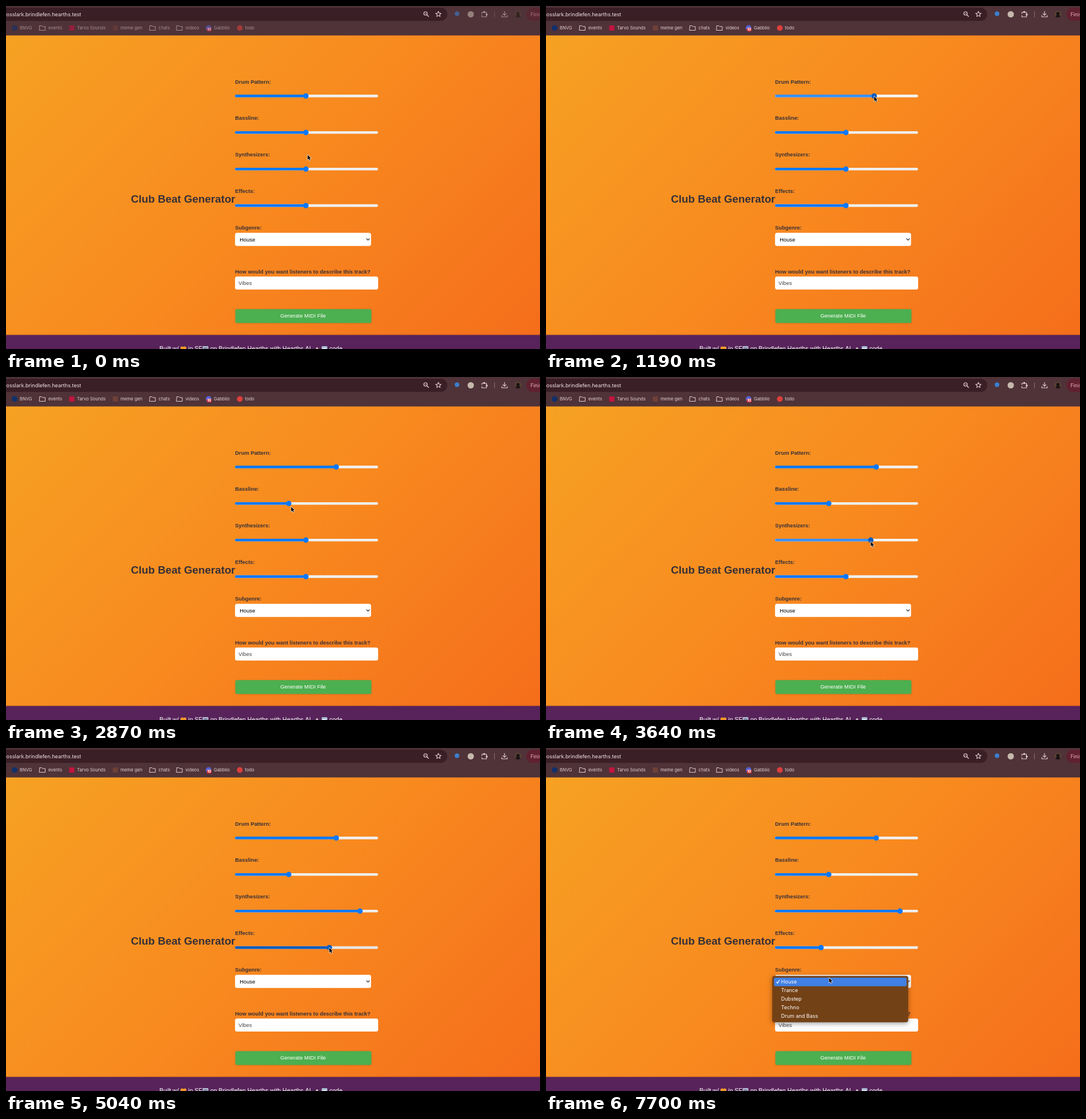
Animation of 933x600 px, one loop 8000 ms. Source, as an HTML page with a canvas:

```html
<!DOCTYPE html>
<html lang="en">
<head>
<meta charset="utf-8">
<title>Club Beat Generator</title>
<style>
html, body { margin: 0; width: 100%; height: 100%; overflow: hidden; background: #f88b1f; }
canvas { display: block; }
</style>
</head>
<body>
<canvas id="stage" width="933" height="600"></canvas>
<script>
const ctx = document.getElementById('stage').getContext('2d');
const LOOP = 8000, STEP = 70;
const PAGE = '"Liberation Sans", Arial, sans-serif';
const UI = 'Inter, Roboto, sans-serif';
const INK = '#e2ced2', LABEL = '#363038', BAR = '#4f3338';
const THUMB_START = 524;

// One gesture per slider: the pointer reaches it, presses, drags and leaves.
const SLIDERS = [
  { label: 'Drum Pattern:', reach: 980, press: 980, drag: 980, drop: 1330, leave: 1470, lit: 490,
    from: [568, 157], to: [577, 159] },
  { label: 'Bassline:', reach: 1960, press: 2310, drag: 2310, drop: 2520, leave: 2840, lit: 350,
    from: [524, 221], to: [494, 221] },
  { label: 'Synthesizers:', reach: 3430, press: 3640, drag: 3710, drop: 4130, leave: 4340, lit: 490,
    from: [567.5, 288], to: [618.5, 286] },
  { label: 'Effects:', reach: 4830, press: 4900, drag: 6160, drop: 6440, leave: 7210, lit: 140,
    from: [565, 349.5], to: [480.5, 341.5] }
].map((s, i) => ({ ...s, y: 157.4 + 63.9 * i }));

// Pointer stops between the gestures: [time, x, y]
const PATH = [
  [0, 527, 260.5], [630, 527, 260.5], [840, 567, 166], [1750, 556, 208],
  [3220, 548, 297], [4620, 572, 361], [7490, 494.5, 402]
].concat(SLIDERS.flatMap(s => [
  [s.reach, ...s.from], [s.drag, ...s.from], [s.drop, ...s.to], [s.leave, ...s.to]
])).sort((a, b) => a[0] - b[0]);

const LOOK = {
  idle: { fill: '#0a78fa', knob: '#0a78fa', rest: '#efefef' },
  hover: { fill: '#0a5cc0', knob: '#0a5cc0', rest: '#e8e5e2' },
  press: { fill: '#3a90fb', knob: '#0a5cc0', rest: '#f3f3f3' }
};

const clamp = v => Math.min(1, Math.max(0, v));
const mix = (a, b, k) => a + (b - a) * k;
const progress = (t, a, b) => clamp((t - a) / (b - a));

function pointerAt(t) {
  const next = PATH.findIndex(p => p[0] > t);
  if (next < 0) return PATH[PATH.length - 1].slice(1);
  const a = PATH[next - 1], b = PATH[next], k = progress(t, a[0], b[0]);
  return [mix(a[1], b[1], k), mix(a[2], b[2], k)];
}

function text(str, x, y, size, color, font = PAGE, weight = 400, align = 'left') {
  ctx.font = `${weight} ${size}px ${font}`;
  ctx.textAlign = align;
  ctx.fillStyle = color;
  ctx.fillText(str, x, y);
}
const label = (str, y) => text(str, 400.3, y, 9.4, LABEL, PAGE, 700);

function box(x, y, w, h, r, color) {
  ctx.beginPath();
  ctx.roundRect(x, y, w, h, r);
  ctx.fillStyle = color;
  ctx.fill();
}

function dot(x, y, r, color) {
  ctx.beginPath();
  ctx.arc(x, y, r, 0, 7);
  ctx.fillStyle = color;
  ctx.fill();
}

function line(points, color, width, close) {
  ctx.beginPath();
  points.forEach(([x, y]) => ctx.lineTo(x, y));
  if (close) ctx.closePath();
  ctx.strokeStyle = color;
  ctx.lineWidth = width;
  ctx.lineJoin = ctx.lineCap = 'round';
  ctx.stroke();
}

function shaded(color, blur, dy, draw) {
  ctx.save();
  ctx.shadowColor = color;
  ctx.shadowBlur = blur;
  ctx.shadowOffsetY = dy;
  draw();
  ctx.restore();
}

function folder(x, y) {
  line([[x, y - 4], [x + 4, y - 4], [x + 5.5, y - 2.5], [x + 10, y - 2.5], [x + 10, y + 4], [x, y + 4]],
       INK, 1, true);
}

function star(x, y) {
  const points = Array.from({ length: 10 }, (_, i) => {
    const r = i % 2 ? 2.3 : 5, a = i * Math.PI / 5 - Math.PI / 2;
    return [x + r * Math.cos(a), y + r * Math.sin(a)];
  });
  line(points, INK, 1.1, true);
}

function magnifier(x, y) {
  ctx.beginPath();
  ctx.arc(x, y, 3, 0, 7);
  ctx.strokeStyle = INK;
  ctx.lineWidth = 1.2;
  ctx.stroke();
  line([[x + 2.4, y + 2.4], [x + 5.2, y + 5.2]], INK, 1.4);
  line([[x - 1.2, y], [x + 1.2, y]], INK, 0.8);
}

function puzzle(x, y) {
  line([[x - 4, y - 3], [x + 4, y - 3], [x + 4, y + 5], [x - 4, y + 5]], INK, 1.2, true);
  dot(x, y - 3.6, 1.7, INK);
  dot(x + 4.5, y + 1, 1.7, INK);
  dot(x - 3.8, y + 1, 1.4, BAR);
}

function download(x, y) {
  line([[x, y - 4.5], [x, y + 2]], INK, 1.2);
  line([[x - 2.8, y - 0.6], [x, y + 2.2], [x + 2.8, y - 0.6]], INK, 1.2);
  line([[x - 4.7, y + 2.5], [x - 4.7, y + 5], [x + 4.7, y + 5], [x + 4.7, y + 2.5]], INK, 1.2);
}

function avatar(x, y) {
  ctx.save();
  ctx.beginPath();
  ctx.arc(x, y, 6, 0, 7);
  ctx.clip();
  box(x - 6, y - 6, 12, 12, 0, '#5b4334');
  dot(x, y - 1, 3, '#1c1416');
  dot(x, y + 6, 5, '#1c1416');
  ctx.restore();
}

function addressBar(t) {
  const focus = t >= 630 && t < 1050;
  box(-30, 3, 801, 23, 11.5, focus ? '#523238' : '#3b1f26');
  if (focus) {
    ctx.strokeStyle = '#eab0b6';
    ctx.lineWidth = 1.7;
    ctx.stroke();
    box(-2, 9, 134, 11.5, 0, '#e8b6ba');
  }
  text('mosslark.brindlefen.hearths.test', 131.3, 17.8, 9.1, focus ? '#40222a' : '#f0e4e6', UI, 400, 'right');
  magnifier(733, 13);
  star(755.5, 14.3);
}

function toolbar() {
  dot(788, 13.5, 4, '#3b7fd0');
  dot(812, 14.5, 5.5, '#c6b9ac');
  puzzle(835.5, 14);
  line([[853.5, 9.5], [853.5, 19.5]], '#8b6a70', 1);
  download(871, 14);
  avatar(894.5, 14.3);
  box(909, 3, 60, 23, 11.5, '#5f2130');
  text('Finish', 916.5, 17.8, 8.8, '#f0b4bd', UI);
}

const disc = color => x => dot(x + 5, 38.5, 5, color);
const tile = color => x => box(x + 0.5, 34, 9, 9, 0, color);
const directory = x => folder(x - 1.5, 38.5);
function chat(x) {
  disc('#5662d8')(x);
  box(x + 2, 38, 8, 6.5, 2, '#d8343c');
  text('10', x + 6, 43.4, 6, '#fff', UI, 700, 'center');
}
const BOOKMARKS = [
  ['BNVG', 24, disc('#12306b')], ['events', 74, directory], ['Tarvo Sounds', 124, tile('#c3143f')],
  ['meme gen', 200, tile('#6e4038')], ['chats', 266.5, directory], ['videos', 313.5, directory],
  ['Gabblio', 363, chat], ['todo', 417.5, disc('#dd3f3c')]
];

function browser(t) {
  box(0, 0, 933, 51.6, 0, BAR);
  addressBar(t);
  ctx.globalAlpha = mix(0.58, 1, progress(t, 0, 420));
  toolbar();
  for (const [name, x, icon] of BOOKMARKS) {
    icon(x - 14);
    text(name, x, 41.3, 7.7, INK, UI);
  }
  ctx.globalAlpha = 1;
}

function slider(s, t) {
  const hover = t >= s.reach && t < s.leave;
  const press = t >= s.press && t < s.press + s.lit;
  const look = LOOK[press ? 'press' : hover ? 'hover' : 'idle'];
  const x = t < s.press ? THUMB_START : mix(s.from[0], s.to[0], progress(t, s.drag, s.drop));
  label(s.label, s.y - 21.9);
  box(400, s.y - 2.3, 250, 4.6, 2.3, look.rest);
  box(400, s.y - 2.3, x - 400, 4.6, 2.3, look.fill);
  dot(x, s.y, 4.7, look.knob);
}

function page(t) {
  const g = ctx.createLinearGradient(0, 0, 754, 754);
  g.addColorStop(0, '#f6a323');
  g.addColorStop(0.5, '#f88a1f');
  g.addColorStop(1, '#f56e1b');
  box(0, 0, 933, 600, 0, g);

  text('Club Beat Generator', 218.3, 344.4, 18.75, LABEL, PAGE, 700);
  SLIDERS.forEach(s => slider(s, t));

  label('Subgenre:', 391.2);
  box(400.2, 396.7, 237.6, 23, 3.5, '#fff');
  text('House', 408.3, 411.6, 9.4, '#000');
  line([[630, 407], [632.5, 409.6], [635, 407]], '#222', 1.1);

  label('How would you want listeners to describe this track?', 467.7);
  box(400.2, 473.2, 250, 22.8, 3.5, '#fff');
  text('Vibes', 406.3, 487.6, 9.4, '#444');

  shaded('rgba(0,0,0,.15)', 3, 0.5, () => box(400.7, 530.2, 237.8, 24.2, 3, '#4caf50'));
  text('Generate MIDI File', 519, 545.4, 9.45, '#fff', PAGE, 400, 'center');
}

function footer() {
  shaded('rgba(60,10,40,.3)', 3, -0.5, () => box(-9, 575.6, 951, 40, 0, '#57235a'));
  const say = (s, x) => text(s, x, 602.8, 10.5, '#fff');
  say('Built w/', 268);
  dot(307.7, 598.3, 2.8, '#f39a2c');
  dot(312.3, 598.3, 2.8, '#f39a2c');
  say('in SF', 318.3);
  box(343.5, 595, 10, 9, 1, '#b9c0d2');
  box(345, 597, 7, 7, 0, '#7f86a6');
  say('on Brindlefen Hearths with Hearths AI', 357);
  dot(543.5, 599, 2, '#c9b9bd');
  box(551.5, 595, 10, 9, 1.5, '#a9bfd6');
  line([[553.5, 599.5], [559, 599.5]], '#fff', 1.5);
  say('code', 565);
}

function menu() {
  shaded('rgba(0,0,0,.4)', 8, 2, () => box(395.3, 398.8, 237.5, 81, 4, '#734116'));
  box(398.3, 401.8, 231.7, 15, 2.5, '#4180e4');
  line([[402.8, 409.2], [404.6, 411.6], [407.8, 406]], '#fff', 1.2);
  ['House', 'Trance', 'Dubstep', 'Techno', 'Drum and Bass'].forEach((s, i) =>
    text(s, 410.8, 412.4 + i * 15, 9, '#fff', UI));
}

function pointer(t) {
  ctx.save();
  ctx.translate(...pointerAt(t));
  line([[0, 0], [0, 8.4], [2, 6.6], [3.3, 9.6], [4.7, 9], [3.4, 6.1], [5.9, 6]], '#fff', 1.2, true);
  ctx.fillStyle = '#000';
  ctx.fill();
  ctx.restore();
}

function frame(now) {
  const t = Math.floor((now % LOOP) / STEP) * STEP;
  page(t);
  footer();
  browser(t);
  if (t >= 7700) menu();
  pointer(t);
  requestAnimationFrame(frame);
}
requestAnimationFrame(frame);
</script>
</body>
</html>
```
